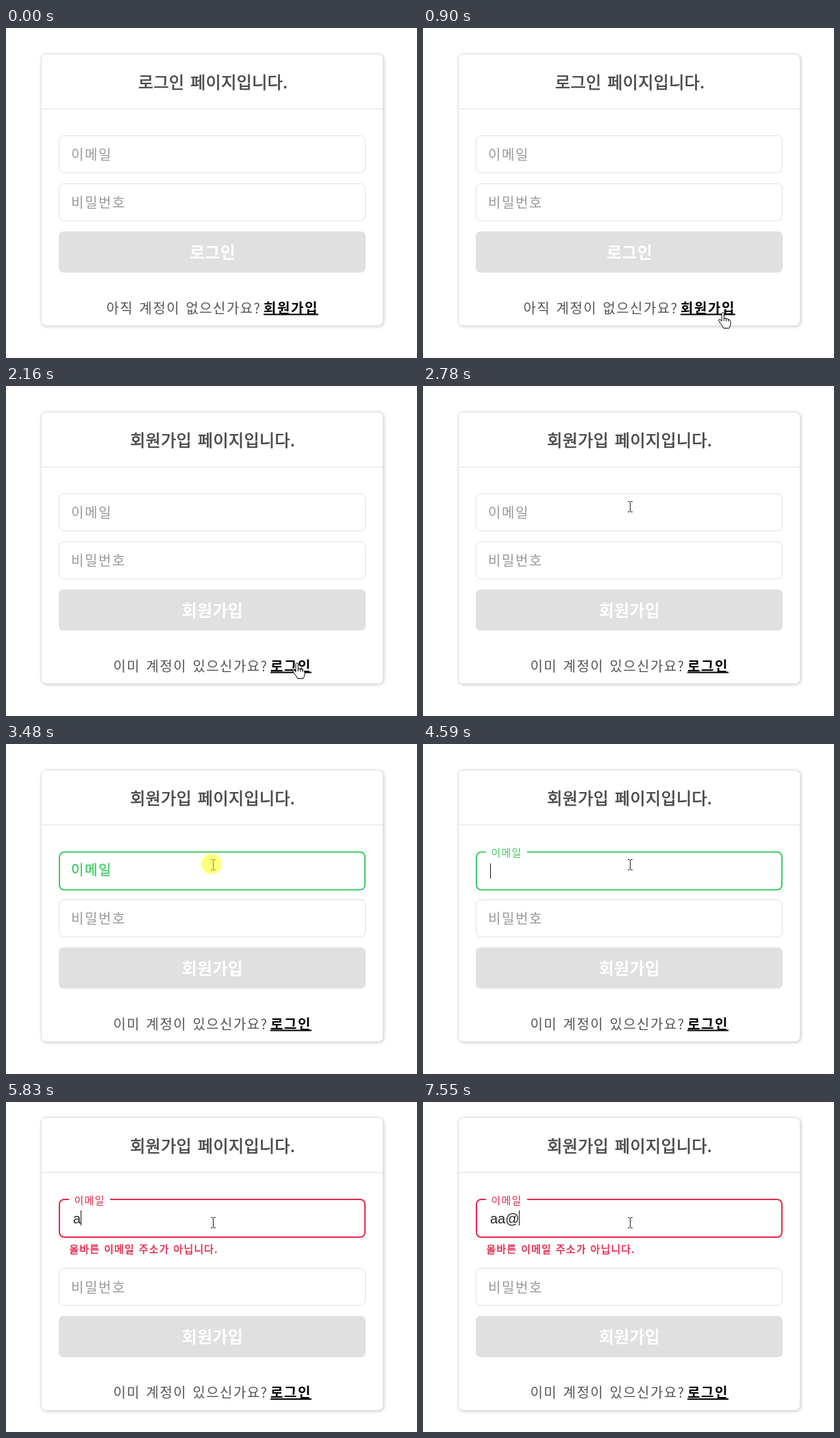
An HTML page for the animation above (8000 ms loop, 600 by 481 pixels).

```html
<!DOCTYPE html>
<html lang="ko">
<head>
<meta charset="utf-8">
<title>회원가입</title>
<style>
  html, body { margin: 0; width: 100%; height: 100%; overflow: hidden; background: #fff; }
  svg { display: block; width: 100%; height: 100%; }
  text { font-family: "Noto Sans CJK KR", "Noto Sans CJK", sans-serif; font-size: 20px; font-weight: 300; letter-spacing: 1.6px; fill: #555; }
  .card { fill: #fff; stroke: #dedede; filter: drop-shadow(1px 1px 2px rgba(0, 0, 0, .2)); }
  .rule { stroke: #dedede; }
  /* A thin stroke gives a weight between regular and bold. */
  #title { font-size: 24px; font-weight: 400; letter-spacing: .4px; word-spacing: 1.8px; fill: #4a4a4a; stroke: #4a4a4a; stroke-width: .7px; }
  .field { fill: #fff; stroke: #dedede; }
  .hint, #label text { fill: #999; }
  #submit { font-size: 24px; font-weight: 700; letter-spacing: .3px; text-anchor: middle; fill: #fff; }
  #ask { letter-spacing: 1.4px; word-spacing: 1.5px; }
  #link { font-weight: 700; fill: #000; }
  #error { font-size: 15px; font-weight: 400; letter-spacing: 1.1px; word-spacing: .7px; fill: var(--accent); stroke: var(--accent); stroke-width: .5px; }
  #typed { font-family: "Liberation Sans", Arial, sans-serif; font-weight: 400; letter-spacing: 0; fill: #222; }
  .focused { --accent: #3fcb64; }
  .invalid { --accent: #e8274b; }
  .focused #email { stroke: var(--accent); stroke-width: 2px; }
  .focused #label text { fill: var(--accent); }
  .resting #label text { font-weight: 400; stroke: var(--accent); stroke-width: .4px; }
  .pointer { fill: #fff; stroke: #000; stroke-linejoin: round; }
</style>
</head>
<body>
<svg id="stage" viewBox="0 0 600 481">
  <rect id="card" class="card" x="51.5" width="499" rx="7"/>
  <g id="top">
    <path class="rule" d="M52 118H550"/>
    <text id="title" y="88"></text>
  </g>
  <g id="emailRow">
    <rect id="email" class="field" rx="7"/>
    <text id="error" x="92.5" y="235">올바른 이메일 주소가 아닙니다.</text>
  </g>
  <text id="typed" x="98" y="176.5"></text>
  <rect id="caret" width="1" height="22" fill="#111"/>
  <g id="label">
    <rect id="notch" x="-10" y="-18" width="80" height="24" fill="#fff"/>
    <text>이메일</text>
  </g>
  <g id="bottom">
    <rect class="field" x="77.5" y="227" width="447" height="54" rx="7"/>
    <text class="hint" x="95" y="262">비밀번호</text>
    <rect x="77" y="296.5" width="448" height="60" rx="7" fill="#e0e0e0"/>
    <text id="submit" x="301.5" y="335.5"></text>
    <text id="ask" y="415.5"></text>
    <text id="link" y="415.5"></text>
    <rect id="underline" y="416.5" height="2"/>
  </g>
  <g id="cursor">
    <path id="arrow" class="pointer" d="M0 0V16.5L4 12.8l2.6 6 2.4-1-2.6-5.8h5.4z"/>
    <g id="hand" class="pointer">
      <path d="M-2 12V1.5a1.7 1.7 0 0 1 3.4 0V8q4 0 8 2.2q1.6 1 1.6 3.3v3.5q-.6 3-2 5.5h-8.5q-.8-2.5-3-5.2l-3.5-5q-1-1.8.4-2.6q1.5-.5 3.6 2.8z"/>
      <path d="M1.4 8v4M4.6 9v3.5M7.8 10v3"/>
    </g>
    <path id="beam" fill="none" stroke="#222" d="M-3 -7.5h2.5l1 1 1-1H4M.5 -7V7M-3 7.5h2.5l1-1 1 1H4"/>
    <circle id="press" cx="-2" cy="-1" r="15" fill="#ff0" fill-opacity=".5"/>
  </g>
</svg>
<script>
const LOOP = 8000, STEP = 70, GROW = 15.5;
const ENTER = 550, PRESS_LINK = 1950, OPEN_SIGNUP = 2160, LEAVE = 2500, FOCUS = 3480, TYPE = 4720;
const entry = [491, 460], linkSpot = [425, 404], fieldSpot = [302, 176];
const pages = {
  login: { name: '로그인', titleX: 193, askX: 146.5, ask: '아직 계정이 없으신가요?', link: '회원가입', linkX: 376 },
  signup: { name: '회원가입', titleX: 181.2, askX: 156.5, ask: '이미 계정이 있으신가요?', link: '로그인', linkX: 386 },
};

const el = id => document.getElementById(id);
const set = (id, attrs) => Object.entries(attrs).forEach(([key, value]) => el(id).setAttribute(key, value));
const show = (id, on) => { el(id).style.visibility = on ? 'visible' : 'hidden'; };
const shift = (id, y) => set(id, { transform: `translate(0 ${y})` });
const within = (t, from, to) => t >= from && t < to;
const mix = (a, b, p) => a + (b - a) * p;
const smooth = p => p * p * (3 - 2 * p);

function progress(t, start, count, first = 0) {
  const step = Math.floor((t - start) / STEP) + first;
  return smooth(Math.min(1, Math.max(0, step / (count - 1 + first))));
}

function drawPage(t) {
  const page = t < OPEN_SIGNUP ? pages.login : pages.signup;
  el('title').textContent = page.name + ' 페이지입니다.';
  el('submit').textContent = page.name;
  el('ask').textContent = page.ask;
  el('link').textContent = page.link;
  set('title', { x: page.titleX });
  set('ask', { x: page.askX });
  set('link', { x: page.linkX });
  set('underline', { x: page.linkX, width: page.link.length * 20 });
}

function drawForm(t) {
  const focused = t >= FOCUS, invalid = t >= TYPE;
  const float = progress(t, FOCUS, 5);
  const grow = invalid ? GROW : 0;
  el('stage').setAttribute('class', [focused && 'focused', invalid && 'invalid', focused && !float && 'resting'].filter(Boolean).join(' '));

  // The error line makes the centred card grow both ways.
  set('card', { y: 38 - grow, height: 396 + 2 * grow });
  shift('top', -grow);
  shift('emailRow', -grow);
  shift('bottom', grow);
  set('email', focused ? { x: 78, y: 157.5, width: 446, height: 55 } : { x: 77.5, y: 157, width: 447, height: 54 });
  show('error', invalid);

  const x = mix(95, 99.5, float), y = mix(focused ? 191 : 192, 164, float) - grow;
  set('label', { transform: `translate(${x} ${y}) scale(${mix(1, .75, float)})` });
  show('notch', focused);

  const typed = t < TYPE ? '' : t < 7420 ? 'a' : t < 7550 ? 'aa' : 'aa@';
  const blinkedOff = within(t, 4040, 4590) || within(t, 5210, 5830) || within(t, 6320, 6870);
  el('typed').textContent = typed;
  set('caret', { x: [98, 109, 120, 140][typed.length], y: invalid ? 158 : 174 });
  show('caret', focused && !blinkedOff);
}

function drawCursor(t) {
  const leaving = t >= LEAVE;
  const p = leaving ? progress(t, LEAVE, 5, 1) : progress(t, ENTER, 8);
  const [from, to] = leaving ? [linkSpot, fieldSpot] : [entry, linkSpot];
  const x = mix(from[0], to[0], p), y = mix(from[1], to[1], p);
  const overField = within(y, 157, 212) || within(y, 227, 282);
  const overLink = within(x, 376, 456) && within(y, 397, 420);
  const visible = t >= ENTER;
  set('cursor', { transform: `translate(${Math.round(x)} ${Math.round(y)})` });
  show('beam', visible && overField);
  show('hand', visible && overLink);
  show('arrow', visible && !overField && !overLink);
  show('press', within(t, PRESS_LINK, PRESS_LINK + 140) || within(t, FOCUS, FOCUS + 140));
}

function frame() {
  const t = performance.now() % LOOP;
  drawPage(t);
  drawForm(t);
  drawCursor(t);
  requestAnimationFrame(frame);
}
frame();
</script>
</body>
</html>
```
